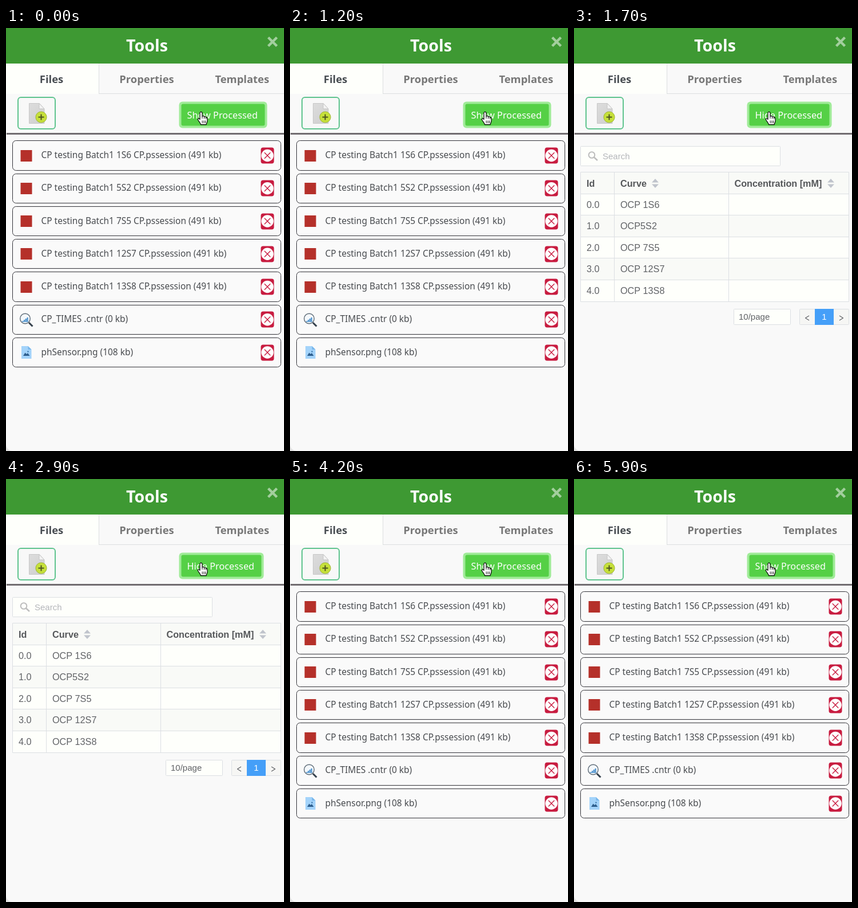
An HTML page with a canvas that plays this animation: 486 px wide and 738 px high, repeating every 6000 ms.

```html
<!DOCTYPE html>
<html lang="en">
<head>
<meta charset="utf-8">
<title>Tools panel</title>
<style>
  html, body { margin: 0; width: 100%; height: 100%; overflow: hidden; background: #f9f9f9; }
  canvas { display: block; width: 486px; height: 738px; }
</style>
</head>
<body>
<canvas id="stage" width="486" height="738"></canvas>
<script>
const ctx = document.getElementById('stage').getContext('2d');
const LOOP = 6000, TABLE_START = 1300, TABLE_END = 4200;
const UI = '"Noto Sans", "Open Sans", sans-serif';
const GRID = '"Liberation Sans", Arial, sans-serif';

const files = [
  ...['1S6', '5S2', '7S5', '12S7', '13S8'].map(id => ({
    name: `CP testing Batch1 ${id} CP.pssession (491 kb)`, icon: sessionIcon
  })),
  { name: 'CP_TIMES .cntr (0 kb)', icon: chartIcon },
  { name: 'phSensor.png (108 kb)', icon: imageIcon }
];
const curves = ['OCP 1S6', 'OCP5S2', 'OCP 7S5', 'OCP 12S7', 'OCP 13S8'];

function rect(x, y, w, h, fill) {
  ctx.fillStyle = fill;
  ctx.fillRect(x, y, w, h);
}

function box(x, y, w, h, r, fill, stroke, width = 1) {
  ctx.beginPath();
  ctx.roundRect(x + width / 2, y + width / 2, w - width, h - width, r);
  paint(fill, stroke, width);
}

function paint(fill, stroke, width = 1) {
  if (fill) { ctx.fillStyle = fill; ctx.fill(); }
  if (stroke) { ctx.strokeStyle = stroke; ctx.lineWidth = width; ctx.stroke(); }
}

function circle(x, y, r, fill, stroke, width) {
  ctx.beginPath();
  ctx.arc(x, y, r, 0, Math.PI * 2);
  paint(fill, stroke, width);
}

function shape(d, fill, stroke, width) {
  const path = new Path2D(d);
  if (fill) { ctx.fillStyle = fill; ctx.fill(path); }
  if (stroke) { ctx.strokeStyle = stroke; ctx.lineWidth = width; ctx.stroke(path); }
}

function text(str, x, y, font, color, align = 'left') {
  ctx.font = font;
  ctx.textAlign = align;
  ctx.fillStyle = color;
  ctx.fillText(str, x, y);
}

function cross(x, y, r, color, width) {
  shape(`M${x - r} ${y - r}L${x + r} ${y + r}M${x + r} ${y - r}L${x - r} ${y + r}`, null, color, width);
}

function at(x, y, draw) {
  ctx.save();
  ctx.translate(x, y);
  draw();
  ctx.restore();
}

function sessionIcon() {
  rect(-10, -10, 20, 20, '#b5302a');
}

function chartIcon() {
  shape('M4.5 5L11 11.5', null, '#34404c', 3);
  circle(-2, -2, 8.8, '#f4f8fb', '#5d6a76', 1.4);
  [2, 4, 6, 8].forEach((h, i) => rect(-7 + i * 2.7, 4 - h, 2, h, '#3a86c8'));
}

function imageIcon() {
  shape('M-8.5 -11H3L9 -5V11H-8.5Z', '#a3d3fa');
  shape('M3 -11V-5H9Z', '#78b6ea');
  shape('M-5.5 6L-2 0.5L0.5 3L2.5 1L6 6Z', '#2e5f8e');
  circle(3, -1.5, 1.2, '#3d78ac');
}

function addFileIcon() {
  const page = ctx.createLinearGradient(40, 131, 66, 167);
  page.addColorStop(0, '#dcdcdc');
  page.addColorStop(1, '#d0d0d0');
  shape('M40.5 131.5H58L67 141V166.5H40.5Z', page, '#c8c8c8', 1);
  shape('M58 131.5V141H67Z', '#f3f3f3', '#c4c4c4', 1);
  circle(61.5, 155.5, 9.6, '#c6e03a', '#9db534', 1);
  shape('M61.5 150.5V160.5M56.5 155.5H66.5', null, '#4a5220', 2);
}

function hand() {
  ctx.lineJoin = 'round';
  shape('M340 146.5C342 146 343 147 343 149V154C344.5 153 346.2 153.5 346.5 155C348 154 349.5 154.8 349.6 156.2'
    + 'C351 155.6 352 156.5 352 158V162C352 164 350.5 165.5 350.2 168.5H340.5C340 166 337.5 163.5 335.7 160.5'
    + 'C334.5 158.5 336.5 157 338.3 158.7L339 159.4V149C339 147.4 339.3 146.7 340 146.5Z', '#fff', '#111', 1.3);
  shape('M343 154V158M346.5 155V158.5M349.6 156.2V159M343.2 161.5V166M346 161.5V166M348.6 161.5V166', null, '#111', 1);
}

function panel(button, buttonWidth) {
  rect(0, 0, 486, 738, '#f9f9f9');
  shape('M0 726A12 12 0 0 0 12 738H0Z', '#e4e4e4');
  rect(0, 0, 486, 62, '#3e9933');
  text('Tools', 246.5, 41, `bold 28.6px ${UI}`, '#fff', 'center');
  cross(466, 24, 7.5, '#a3cf9e', 4.4);

  rect(0, 62, 162, 53, '#fefffb');
  rect(162, 62, 1, 53, '#dcdfe0');
  rect(163, 114, 323, 1, '#dcdfe0');
  const tabFont = `bold 18.4px ${UI}`;
  text('Files', 79.5, 95.5, tabFont, '#484d52', 'center');
  text('Properties', 246, 95.5, tabFont, '#777', 'center');
  text('Templates', 412.7, 95.5, tabFont, '#777', 'center');

  box(20, 120, 67, 57, 5, '#f8f8f8', '#5fc48e', 2);
  addFileIcon();
  rect(1, 183, 485, 3, '#716c70');

  box(302, 128, buttonWidth, 47, 6, '#a0eb98');
  box(306, 132, buttonWidth - 8, 39, 3, '#55d046');
  text(button, 316.5, 157.5, `16.3px ${UI}`, '#fff');
}

function fileList() {
  files.forEach(({ name, icon }, i) => {
    const y = 196.25 + 57.25 * i;
    const top = Math.round(y), bottom = Math.round(y + 52.4);
    const middle = y + 26.25;
    box(11, top, 470, bottom - top, 6, '#fafafa', '#34343a');
    at(35.5, Math.round(middle), icon);
    text(name, 61.5, Math.round(y + 30.75), `15.45px ${UI}`, '#484b4f');
    box(445, Math.round(middle - 14.5), 24, 29, 4, '#c81c40');
    circle(457, middle, 10.7, '#fff');
    cross(457, middle, 5.2, '#c81c40', 1.4);
  });
}

function sortArrows(x) {
  shape(`M${x - 6} 269.5L${x} 263L${x + 6} 269.5Z`, '#c0c4cc');
  shape(`M${x - 6} 272.5L${x} 279L${x + 6} 272.5Z`, '#c0c4cc');
}

function curveTable() {
  const line = '#dcdfe3', white = '#fefffb', stripe = '#f9faf7';
  box(11, 206, 350, 35, 1, white, line);
  circle(31, 221.5, 5.3, null, '#bdbdbd', 2);
  shape('M35 225.5L41 231', null, '#bdbdbd', 2.4);
  text('Search', 50, 229, `15px ${GRID}`, '#b4b6ba');

  rect(11, 251, 470, 39, stripe);
  const head = `bold 16.2px ${GRID}`, body = `16.2px ${GRID}`;
  text('Id', 22, 277, head, '#55575a');
  text('Curve', 81, 277, head, '#55575a');
  text('Concentration [mM]', 280.5, 277, head, '#55575a');
  sortArrows(142);
  sortArrows(449);

  curves.forEach((name, i) => {
    const y = Math.round(289.5 + 37.5 * i);
    rect(11, y, 470, 38, i % 2 ? stripe : white);
    rect(11, y - 1, 470, 1, line);
    text(i.toFixed(1), 22, y + 24, body, '#606266');
    text(name, 81, y + 24, body, '#606266');
  });
  rect(70, 251, 1, 226, line);
  rect(270, 251, 1, 226, line);
  box(11, 251, 470, 227, 0, null, line);

  box(279, 490, 100, 28, 1, white, line);
  text('10/page', 288, 509, `15px ${GRID}`, '#606266');
  box(394, 490, 87, 28, 1, '#f6f6f4', line);
  rect(421, 490, 33, 28, '#459ff8');
  text('1', 437.5, 509, `15px ${GRID}`, '#fff', 'center');
  shape('M411 502L404.5 506L411 510M464 502L470.5 506L464 510', null, '#606266', 1.3);
}

function frame(now) {
  const t = now % LOOP;
  if (t >= TABLE_START && t < TABLE_END) {
    panel('Hide Processed', 149);
    curveTable();
  } else {
    panel('Show Processed', 155);
    fileList();
  }
  hand();
  requestAnimationFrame(frame);
}
requestAnimationFrame(frame);
</script>
</body>
</html>
```
